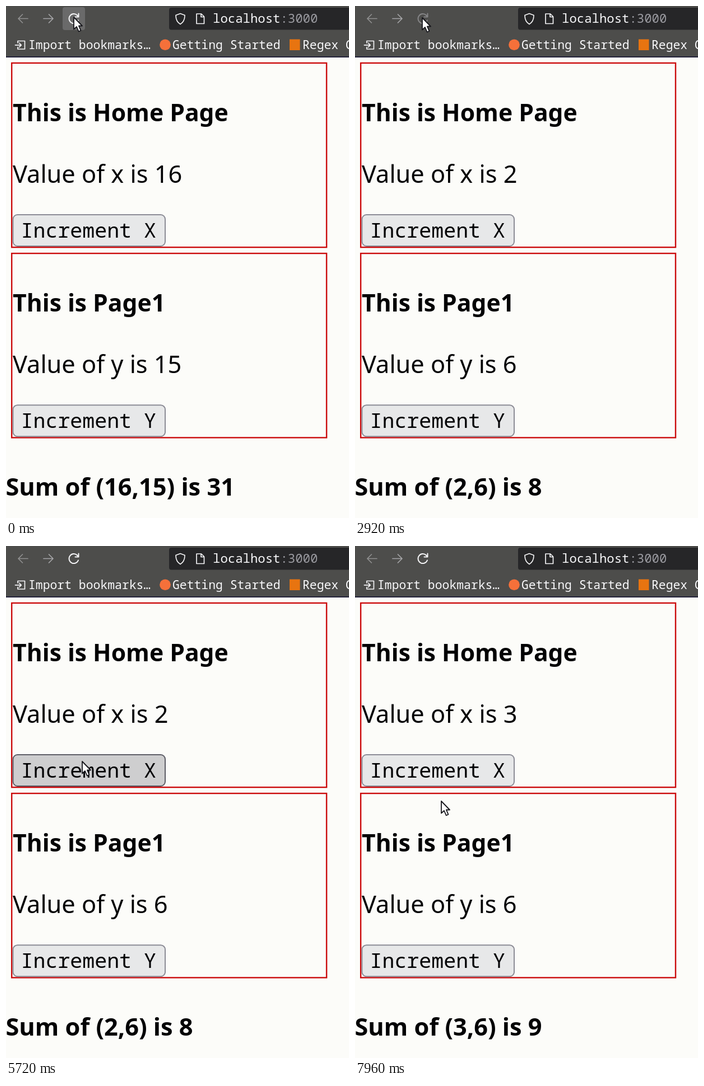
Animation, 612 px wide and 915 px high, one loop 8000 ms. Source, as an HTML page:

```html
<!DOCTYPE html>
<html lang="en">
<head>
<meta charset="utf-8">
<title>Shared counters</title>
<style>
  html, body { margin: 0; width: 100%; height: 100%; overflow: hidden; background: #fcfcf9; }
  svg { display: block; width: 612px; height: 915px; }
  text { font-family: "Noto Sans", "Open Sans", sans-serif; fill: #020204; white-space: pre; }
  .title { font-size: 42.6px; font-weight: 700; }
  .sum { font-size: 43.3px; font-weight: 700; }
  .value { font-size: 43.3px; }
  .mono { font-family: "Noto Sans Mono", "DejaVu Sans Mono", monospace; }
  .label { font-size: 36.6px; font-weight: 500; }
  .bar { font-size: 21.4px; font-weight: 500; fill: #f8f8fa; }
  .url { font-size: 22.3px; font-weight: 500; fill: #f8f8fa; }
  .port { fill: #9b9ba1; }
  .line { fill: none; stroke: #f4f4f6; stroke-width: 1.7; stroke-linecap: round; stroke-linejoin: round; }
  .card { fill: none; stroke: #cb0a0c; stroke-width: 2.4; }
  .button { fill: #e7e8e9; stroke: #8c8c96; stroke-width: 2; }
  .button.hover { fill: #cececf; stroke: #5d5d66; }
  .button.press { fill: #a9a9ab; stroke: #44444c; }
</style>
</head>
<body>
<svg viewBox="0 0 612 915">
  <rect width="612" height="915" fill="#fcfcf9"/>

  <g id="page">
    <g>
      <rect class="card" x="10.2" y="101.9" width="561.8" height="329.3"/>
      <text class="title" x="12" y="206">This is Home Page</text>
      <text class="value" id="xText" x="12" y="316"></text>
      <rect class="button" id="xButton" x="12.5" y="373" width="271.5" height="56" rx="8"/>
      <text class="mono label" x="26.5" y="414">Increment X</text>
    </g>
    <g transform="translate(0 340.2)">
      <rect class="card" x="10.2" y="101.9" width="561.8" height="329.3"/>
      <text class="title" x="12" y="206">This is Page1</text>
      <text class="value" id="yText" x="12" y="316"></text>
      <rect class="button" x="12.5" y="373" width="271.5" height="56" rx="8"/>
      <text class="mono label" x="26.5" y="414">Increment Y</text>
    </g>
    <text class="sum" id="sumText" x="-0.5" y="875"></text>
  </g>

  <g id="toolbar">
    <rect width="612" height="91" fill="#4d4d4b"/>
    <rect y="90" width="612" height="2" fill="#24233c"/>
    <path class="line" style="stroke:#909090" d="M39 22.5H22M29.5 15L22 22.5L29.5 30"/>
    <path class="line" style="stroke:#a5a5a8" d="M67 22.5H84M76.5 15L84 22.5L76.5 30"/>
    <rect id="halo" x="101" y="2" width="40" height="41" rx="4" fill="#6a6a6a"/>
    <path class="line" id="reload" style="stroke-width:2" d="M129 25.5A8.5 8.5 0 1 1 127 16.5L129.5 19M129.5 13.5V19.5H123.5"/>
    <path class="line" id="loading" style="stroke-width:2" d="M112.5 23A8.5 8.5 0 0 1 129.5 23M112 27H117V23M126 28H129"/>

    <rect x="291" y="3" width="340" height="39.5" rx="4" fill="#262628"/>
    <path class="line" d="M311 13.5L319 16.5C319 24 317 29 311 32.5C305 29 303 24 303 16.5Z"/>
    <path class="line" d="M340 14H348.5L353.5 19V31.5H340ZM348 14V19.5H353"/>
    <text class="mono url" x="369" y="30">localhost<tspan class="port">:3000</tspan></text>

    <path class="line" d="M21 66V62.5H33.5V77H21V73.5M16.5 69.8H27M23.5 66L27.3 69.8L23.5 73.6"/>
    <text class="mono bar" x="40" y="77">Import bookmarks…</text>
    <circle cx="284" cy="69.3" r="9.8" fill="#f5703a"/>
    <text class="mono bar" x="297" y="77">Getting Started</text>
    <rect x="506" y="59.5" width="18.5" height="19.5" fill="#e87410"/>
    <text class="mono bar" x="529" y="77">Regex G</text>
  </g>

  <path id="cursor" d="M0 0V21.5L5 17L8.7 25.5L12.5 23.8L8.9 15.5H15Z" fill="#fff" stroke="#17171c" stroke-width="1.8" stroke-linejoin="round"/>
</svg>

<script>
  const LOOP = 8000;
  const $ = id => document.getElementById(id);
  const within = (t, from, to) => t >= from && t < to;
  const show = (el, on) => el.setAttribute("visibility", on ? "visible" : "hidden");

  // Pointer stops: time, x, y
  const stops = [
    [0, 121, 20], [1860, 121, 20], [1940, 120, 21], [3600, 120, 21],
    [4400, 136, 385], [5720, 136, 385], [6200, 138, 387],
    [7200, 138, 387], [7720, 154, 456], [LOOP, 154, 456]
  ];

  function pointer(t) {
    const i = stops.findIndex(s => t < s[0]);
    const [t0, x0, y0] = stops[i - 1], [t1, x1, y1] = stops[i];
    const p = (t - t0) / (t1 - t0), e = p * p * (3 - 2 * p);
    return [x0 + (x1 - x0) * e, y0 + (y1 - y0) * e];
  }

  function draw(t) {
    const blank = within(t, 600, 840) || within(t, 1900, 2360);
    const loading = within(t, 560, 760) || within(t, 1900, 2160);
    const [x, y] = t < 2360 ? [16, 15] : [t < 6420 ? 2 : 3, 6];
    const [px, py] = pointer(t);

    show($("page"), !blank);
    $("xText").textContent = `Value of x is ${x}`;
    $("yText").textContent = `Value of y is ${y}`;
    $("sumText").textContent = `Sum of (${x},${y}) is ${x + y}`;

    show($("halo"), t < 2160);
    show($("loading"), loading);
    show($("reload"), !loading);
    $("reload").style.stroke = within(t, 2160, 3540) ? "#858587" : "#f4f4f6";

    const over = within(py, 373, 429);
    const state = within(t, 6200, 6420) ? "press" : over ? "hover" : "";
    $("xButton").setAttribute("class", `button ${state}`);
    $("cursor").setAttribute("transform", `translate(${px} ${py})`);
  }

  function tick() {
    draw(performance.now() % LOOP);
    requestAnimationFrame(tick);
  }
  tick();
</script>
</body>
</html>
```
